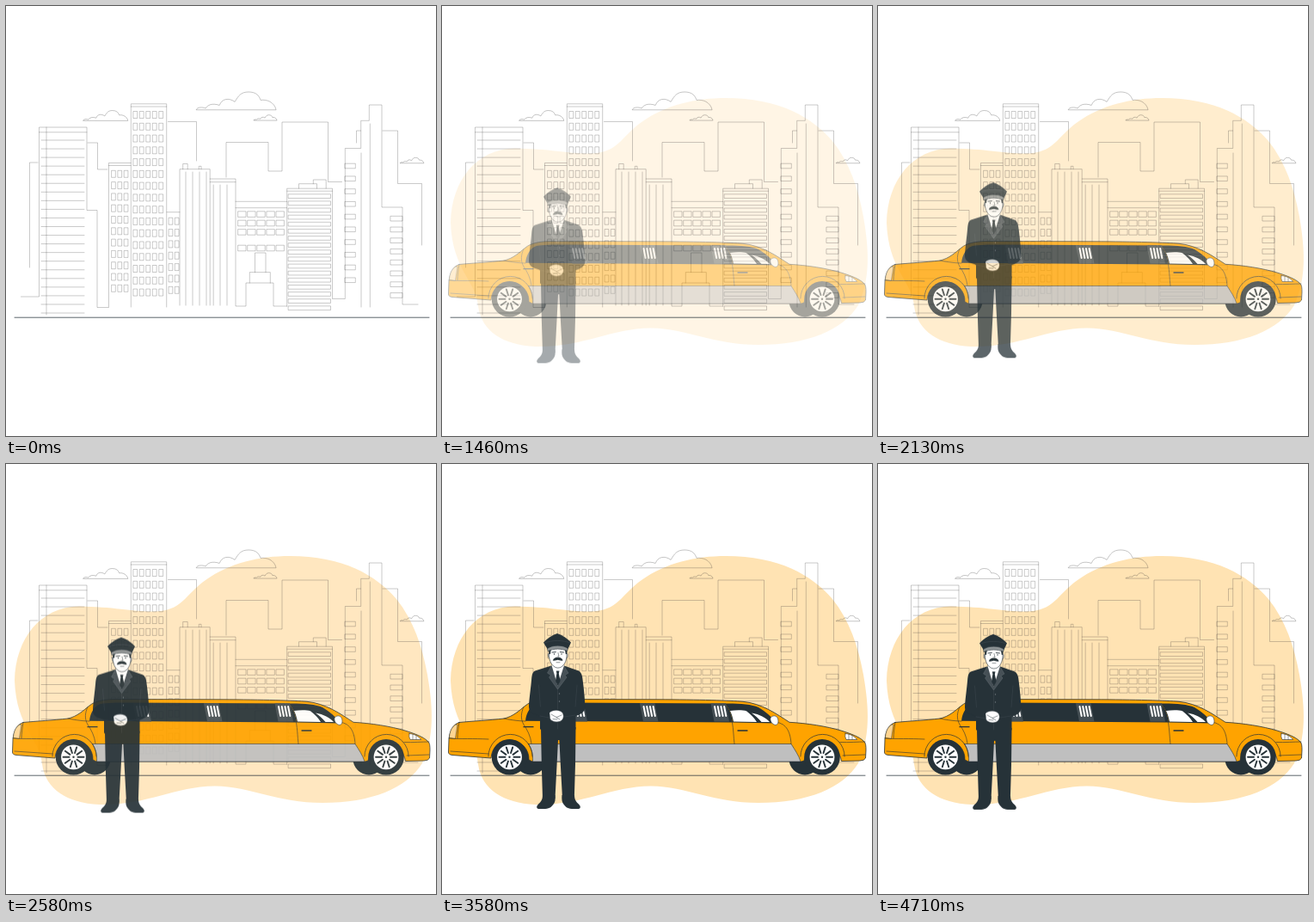
Write an HTML page with a canvas that moves like this. It is 500x500 px and loops after 4750 ms.

```html
<!DOCTYPE html>
<html lang="en">
<head>
<meta charset="utf-8">
<title>Limousine and chauffeur</title>
<style>
html, body { margin: 0; width: 100%; height: 100%; overflow: hidden; background: #fff; }
canvas { display: block; width: 100vw; height: 100vh; }
</style>
</head>
<body>
<canvas id="stage"></canvas>
<script>
const SIZE = 500, LOOP = 4750, FADE = 4250, FPS = 24, RISE = 20;
const DARK = '#263238', ORANGE = '#ffa300', WHITE = '#fff', GREY = '#bfbfbf', INK = '#3a3a3a';
const ratio = Math.max(1, window.devicePixelRatio || 1);
const stage = document.getElementById('stage');
const view = stage.getContext('2d');
stage.width = stage.height = SIZE * ratio;

// Each layer is drawn once, then faded as a whole.
function layer(draw) {
  const c = document.createElement('canvas');
  c.width = c.height = SIZE * ratio;
  const g = c.getContext('2d');
  g.scale(ratio, ratio);
  g.lineJoin = g.lineCap = 'round';
  draw(g);
  return c;
}

function shape(g, d, fill, stroke, width = 0.7) {
  const p = new Path2D(d);
  if (fill) { g.fillStyle = fill; g.fill(p); }
  if (stroke) { g.strokeStyle = stroke; g.lineWidth = width; g.stroke(p); }
}

function disc(g, x, y, r, fill) {
  g.beginPath();
  g.arc(x, y, r, 0, Math.PI * 2);
  g.fillStyle = fill;
  g.fill();
}

function boxes(g, xs, y, w, h, rows, step) {
  for (let i = 0; i < rows; i++)
    for (const x of xs) g.strokeRect(x, y + i * step, w, h);
}

function uprights(g, xs, top, bottom) {
  for (const x of xs) shape(g, `M${x} ${top}V${bottom}`, null, INK, g.lineWidth);
}

function cloud(g, x, base, width) {
  const s = width / 93;
  g.save();
  g.translate(x, base);
  g.scale(s, s);
  shape(g, 'M0 0C1 -3 7 -3 11 -1.5C13 -5 18 -8 27 -5C30 -13 38 -14 45 -9C49 -16 52 -20.5 61 -20.5C69 -20.5 73 -17 75 -11C82 -12 91 -9 93 0Z',
    null, INK, 0.3 / s);
  g.restore();
}

function drawBlob(g) {
  shape(g, 'M10 252C11 203 40 166 85 165.5C125 166 150 172 172 171.5C205 171 207 153 232 135C260 115 295 107 330 107' +
    'C392 107 430 129 454 157C474 182 484 212 490 245C497 285 498 318 484 348C466 377 425 394 368 394' +
    'C315 394 285 375 243 374.5C195 375 165 397 108 396C72 394 46 379 42 349C40 320 12 307 10 252Z', '#ffe3b3');
}

function drawCity(g) {
  const lw = 0.27;
  g.strokeStyle = INK;
  g.lineWidth = lw;
  const line = d => shape(g, d, null, INK, lw);

  // Outlines at the back
  line('M27.5 304V182H37');
  line('M95 159H106.5V190H118');
  line('M188.5 134.5H221.5V180');
  line('M256 199V158.5H305V192H321V135H374.5V204.5H390.5');
  line('M412.5 145H407.5V159');
  line('M438 145H455.5V206.5H483.5V278');

  line('M17.5 338H38.5V141H94V237.5H106V350.5H119.5V182.5H145');
  line('M38.5 146.8H94M47 141V359M119.5 185.5H145');
  for (let i = 0; i < 21; i++) line(`M41 ${156 + i * 10.05}H91`);
  boxes(g, [123, 130.3, 137.6], 191.3, 4.3, 8, 11, 13.3);

  line('M145.3 350V113.8H186.7V350M145.3 117H186.7');
  boxes(g, [148.3, 155.7, 163.2, 170.7, 178.2], 122.5, 4.4, 8, 16, 13.77);
  line('M187 239.7H202');
  boxes(g, [189.5, 196.7], 246.2, 4.3, 8, 7, 13.35);

  line('M202 348V189.7H237.2V348M205.7 189.7V183.5H211.2V189.7M224.3 189.7V186.3H227V189.7');
  uprights(g, [209, 217, 225, 233], 193, 348);
  line('M237.2 201H267V349H279V322H311V349H326.7M237.2 204.7H267');
  uprights(g, [241.2, 249, 257], 208, 348);
  line('M283.3 322V309.6H307.3V322M289.5 309.6V287H302V309.6');

  line('M267 227.3H326.7M267 234.7H326.7');
  const panes = [270, 281.1, 292.2, 303.3, 314.4];
  boxes(g, panes, 238.8, 9, 6.6, 3, 10.4);
  boxes(g, panes, 278.2, 9, 6.6, 1, 0);

  line('M326.7 349V212.2H379.5V340.5H394.3V165.5H412.7V133.3H422.3V115H437V234H461V347H479');
  line('M326.7 215.2H379.5M340.5 212V206.7H361.5V212M357.3 206.7V202H372.2V212');
  boxes(g, [328.5], 218.8, 49, 4.7, 17, 8.13);
  uprights(g, [413], 171, 350);
  uprights(g, [423.3], 137, 350);
  boxes(g, [394.3], 183.2, 12, 5.6, 10, 14.75);
  boxes(g, [447.3], 244.3, 13.7, 5.7, 8, 12.75);

  cloud(g, 221.3, 120.4, 92.7);
  cloud(g, 89.7, 133, 52);
  cloud(g, 288, 132.7, 27);
  cloud(g, 458.3, 182.4, 27.5);
  shape(g, 'M10 362.2H492', null, DARK, 0.75);
}

function wheel(g, x, y) {
  disc(g, x, y, 20.8, DARK);
  disc(g, x, y, 14.4, WHITE);
  g.strokeStyle = DARK;
  g.lineWidth = 1.9;
  for (let i = 0; i < 10; i++) {
    const a = i * Math.PI / 5;
    g.beginPath();
    g.moveTo(x + 5 * Math.cos(a), y + 5 * Math.sin(a));
    g.lineTo(x + 12 * Math.cos(a), y + 12 * Math.sin(a));
    g.stroke();
  }
  disc(g, x, y, 1.2, DARK);
}

function arch(g, x, y) {
  g.beginPath();
  g.arc(x, y, 25.6, Math.PI, Math.PI * 2);
  g.strokeStyle = DARK;
  g.lineWidth = 0.7;
  g.stroke();
}

function drawCar(g) {
  disc(g, 103, 343, 18.5, DARK);
  disc(g, 422, 343, 18.5, DARK);
  shape(g, 'M20 300.5C35 299 55 298 72 296C83 293.5 90 286.5 97 281C103 276 112 274 125 273.5L250 273.8' +
    'C300 274 335 275 350 276.3C372 278.5 389 290.5 404 300.3C425 301.5 447 305 464 310C475 313.5 485 317 490 322' +
    'C493 324 493 328 493 333L492.5 342Q491 345 486 345L464.5 345.5A22 22 0 0 0 421 345L418 346H105L101 344' +
    'A22 22 0 0 0 57 342L12 338.5Q7.5 338 7.5 335L8 320C9 311 12 303 20 300.5Z', ORANGE, DARK, 0.8);
  shape(g, 'M100.5 325.5H406C410 332 415 339 417 346H105.5C106 337 104 331 100.5 325.5Z', GREY, DARK, 0.6);

  // Glass
  shape(g, 'M97 298.7C98 289 103 281 110 279C118 277.4 130 277.5 145 277.5L329 278.5C335 286 337 293 338 300.5Z', DARK);
  shape(g, 'M329 278.5C345 278.3 360 279.3 368 283C376 287.5 383 293.5 389 301.5L338 300.5C337 293 335 286 329 278.5Z', DARK);
  shape(g, 'M335 287C342 286 350 286 354 287.3C359 291 363 295.5 366 300L339 299.5C338 295 337 291 335 287Z', WHITE);
  shape(g, 'M360 289.5C369 291 377 295 381 300H371.5C368 296 364 292 360 289.5Z', WHITE);
  for (const x of [150, 232.5, 315]) {
    shape(g, `M${x - 2.5} 278.2H${x + 15}L${x + 19} 299.5H${x + 1.5}Z`, '#454f54');
    for (let i = 0; i < 4; i++)
      shape(g, `M${x + 2 + i * 3.7} 282L${x + 4.2 + i * 3.7} 293`, null, WHITE, 2);
  }

  // Seams and handles
  const seam = (d, w) => shape(g, d, null, DARK, w || 0.6);
  seam('M95 282.5C92 289 91 296 95 303C99 309 103 316 104 325');
  seam('M72 296C82 298 91 299 97 299');
  seam('M337.5 300.5C339 309 339 317 340 325.5');
  seam('M387 300C399 301 405 309 406 325.5');
  seam('M95 305.7H106M344 310H355', 1.3);
  seam('M20 300.5C19 307 18 313 18 319M8 319C22 320 36 319 54 320M10 334L54 337');
  seam('M463 323.5C473 324 484 323 492 323M466 339L492 338');
  shape(g, 'M8.5 318C9 311 11 306 16 303L18 303L15.5 319Z', '#ffd592', DARK, 0.5);
  shape(g, 'M469 313.5C475 314 480 316.5 482.5 320.5H470Q468 317 469 313.5Z', WHITE, DARK, 0.6);
  seam('M473 314.5V320M477 316V320', 0.5);
  shape(g, 'M382 295C384 292 389 292 390.5 296C391.5 300 391 303 388 303.5C384 303 381 299 382 295Z', WHITE, DARK, 0.6);

  arch(g, 79.5, 340);
  arch(g, 442.5, 340);
  wheel(g, 78.5, 340.8);
  wheel(g, 442, 340.8);
}

function shoe(g) {
  shape(g, 'M117 386H131.5C132 391 131.5 394 130 396C127 400.5 124 402 118 402H112Q108.5 400.5 111.5 397C115 394 117 391 117 386Z', DARK);
}

function drawMan(g) {
  const fold = '#737d81', lapel = '#465056';
  shape(g, 'M115 307L115.8 350L117 390H131.5L133.6 350L135 322H136.4L137.8 350L140 390H153.8L155 350L155.5 307Z', DARK);
  shoe(g);
  g.save();
  g.translate(271, 0);
  g.scale(-1, 1);
  shoe(g);
  g.restore();

  shape(g, 'M127 235.5L108 241.5Q104.8 243 104.3 249C103.3 262 101.3 274 101 283C101 289 105 291 112 293L114 294V309.5H155.5V294' +
    'C162 292 166 289 166.3 284C166.3 273 164.5 258 163 248Q162 243 159 241.5L142 235.5Z', DARK);
  shape(g, 'M112.5 258L114.5 283M157 258L155 283M114 294L125 296M155 293L142 295M134.5 261V286M134.5 302V309', null, lapel, 0.4);

  shape(g, 'M127 236L122.5 244L126.5 246.5L124.5 249L134.5 263L145 249L143 246.5L147 244L142 236Z', lapel, fold, 0.4);
  shape(g, 'M127.5 235L134.5 259L142 235Z', WHITE);
  shape(g, 'M132.8 241.5H136.5L135.8 244.5L137.6 253L134.6 259L132 253L133.4 244.5Z', DARK);
  disc(g, 136.5, 268, 0.7, fold);
  disc(g, 136.5, 277, 0.7, fold);

  // Head
  shape(g, 'M125 220Q122.5 221 123.7 225Q124.5 228 126 227.5M144.5 220Q147 221 146 225Q145 228 143.5 227.5', WHITE, DARK, 0.6);
  shape(g, 'M124.5 213V225C125.5 233 130 238 134.7 238C140 238 144 233 145 225V213Z', WHITE, DARK, 0.6);
  shape(g, 'M124.3 214H127L126 222H124.5ZM145.2 214H142.5L143.8 222H145Z', DARK);
  shape(g, 'M128 220L132.3 219.6M137.3 219.6L141.5 220', null, DARK, 0.9);
  disc(g, 130.5, 222, 0.7, DARK);
  disc(g, 139, 222, 0.7, DARK);
  shape(g, 'M135 220.5L136 225H134M133 231.7H137', null, DARK, 0.5);
  shape(g, 'M128.8 229.6C129.8 226.5 133 225.3 134.7 226.1C136.5 225.3 139.6 226.5 140.6 229.6C138 230 136 229 134.7 228.8C133.5 229 131 230 128.8 229.6Z', DARK);
  shape(g, 'M118 208.5C122 204 128 200 134 198C140 200 146 204 150 208.5L146.5 216C139 213 129 213 122.5 216Z', DARK);
  shape(g, 'M122.5 215.5C128 211 141 211 146.5 215.5L145.5 218.5C139 215.3 130 215.3 123.5 218.5Z', '#8c9294', DARK, 0.6);
  shape(g, 'M119.5 209C128 205.5 141 205.5 148.5 209', null, lapel, 0.5);

  // Gloves
  shape(g, 'M125 290C128 286.5 135 286.3 139 289C142.5 292 142 297.5 138 300C133 302 127 300.5 125.5 297Z', WHITE, DARK, 0.6);
  shape(g, 'M127 292L133 295.5L139 293M129 297.5L134 298M133 295.5L137 298', null, DARK, 0.5);
}

const blob = layer(drawBlob), city = layer(drawCity), car = layer(drawCar), man = layer(drawMan);

const cubic = (a, b, u) => 3 * a * u * (1 - u) ** 2 + 3 * b * u * u * (1 - u) + u ** 3;

// Cubic-bezier easing with a slight overshoot.
function ease(x) {
  if (x >= 1) return 1;
  let lo = 0, hi = 1;
  for (let i = 0; i < 30; i++) {
    const mid = (lo + hi) / 2;
    if (cubic(0.36, 0.5, mid) < x) lo = mid; else hi = mid;
  }
  return cubic(-0.01, 1.38, lo);
}

function put(img, alpha, dy = 0) {
  view.globalAlpha = Math.max(0, Math.min(1, alpha));
  view.drawImage(img, 0, dy * ratio);
}

function render(ms) {
  const tick = Math.floor((ms % LOOP + 4) * FPS / 1000);
  const t = tick < 8 ? 0 : tick * 1000 / FPS;
  const slow = ease(t / LOOP), fast = ease(t / FADE);
  view.globalAlpha = 1;
  view.fillStyle = WHITE;
  view.fillRect(0, 0, stage.width, stage.height);
  put(blob, slow);
  put(city, 1);
  put(car, fast);
  put(man, fast, RISE * (1 - slow));
}

let start = null;
function loop(now) {
  if (start === null) start = now;
  render(Math.max(0, now - start));
  requestAnimationFrame(loop);
}
render(0);
requestAnimationFrame(loop);
</script>
</body>
</html>
```
